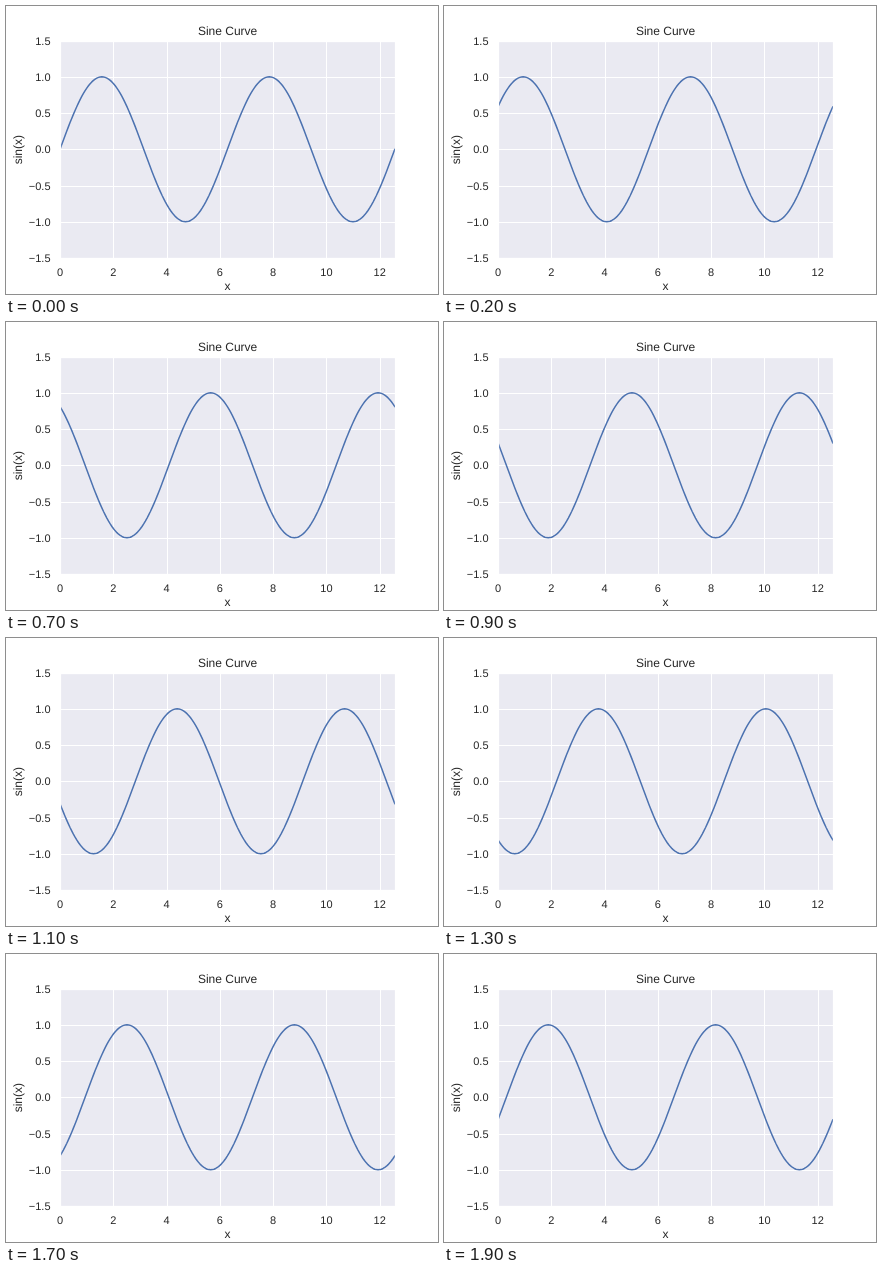
These frames come from a looping animation (432 by 288 pixels, 2000 ms). An HTML page:

```html
<!DOCTYPE html>
<html lang="en">
<head>
<meta charset="utf-8">
<title>Sine Curve</title>
<style>
  html, body { margin: 0; width: 100%; height: 100%; overflow: hidden; background: #fff; }
  svg { display: block; }
  text { font: 11px "Liberation Sans", Arial, sans-serif; fill: #262626; text-anchor: middle; text-rendering: geometricPrecision; }
  .label { font-size: 12px; }
  .tick-y { text-anchor: end; }
  .grid { stroke: #fff; stroke-width: 1; }
  .frame { fill: none; stroke: #fff; stroke-width: 1.25; }
  #curve { fill: none; stroke: #4c72b0; stroke-width: 1.5; stroke-linejoin: round; stroke-linecap: round; }
</style>
</head>
<body>
<svg width="432" height="288" viewBox="0 0 432 288">
  <clipPath id="plot"><rect x="54" y="35" width="335" height="217"/></clipPath>
  <rect x="54" y="35" width="335" height="217" fill="#eaeaf2"/>
  <g id="axes"></g>
  <path id="curve" clip-path="url(#plot)"/>
  <rect class="frame" x="54.5" y="35.5" width="335" height="217"/>
  <text class="label" x="221.6" y="29">Sine Curve</text>
  <text class="label" x="221.4" y="284">x</text>
  <text class="label" transform="translate(16 143.7) rotate(-90)">sin(x)</text>
</svg>
<script>
const X_MAX = 4 * Math.PI, SAMPLES = 200;
const STEP_MS = 100, STEPS = 20;

const toX = x => 54 + x / X_MAX * 334.8;
const toY = y => 143.28 - y * 72.48;
// Grid lines sit on pixel centres.
const snap = v => Math.floor(v + 0.5) + 0.5;

const axes = document.getElementById("axes");
const curve = document.getElementById("curve");

function add(tag, attributes, content = "") {
  const node = document.createElementNS("http://www.w3.org/2000/svg", tag);
  for (const name in attributes) node.setAttribute(name, attributes[name]);
  node.textContent = content;
  axes.append(node);
}

for (let x = 0; x <= 12; x += 2) {
  const px = snap(toX(x));
  add("line", { class: "grid", x1: px, x2: px, y1: 35, y2: 252 });
  add("text", { x: toX(x), y: 270 }, x);
}

for (let y = -1.5; y <= 1.5; y += 0.5) {
  const py = snap(toY(y));
  add("line", { class: "grid", x1: 54, x2: 389, y1: py, y2: py });
  add("text", { class: "tick-y", x: 44.5, y: Math.round(toY(y) + 4) }, y.toFixed(1).replace("-", "\u2212"));
}

function draw(now) {
  const step = Math.floor(now / STEP_MS) % STEPS;
  const phase = step / STEPS * 2 * Math.PI;
  const points = Array.from({ length: SAMPLES + 1 }, (_, i) => {
    const x = i / SAMPLES * X_MAX;
    return `${toX(x).toFixed(2)} ${toY(Math.sin(x + phase)).toFixed(2)}`;
  });
  curve.setAttribute("d", "M" + points.join("L"));
}

function loop() {
  draw(performance.now());
  requestAnimationFrame(loop);
}
loop();
</script>
</body>
</html>
```
